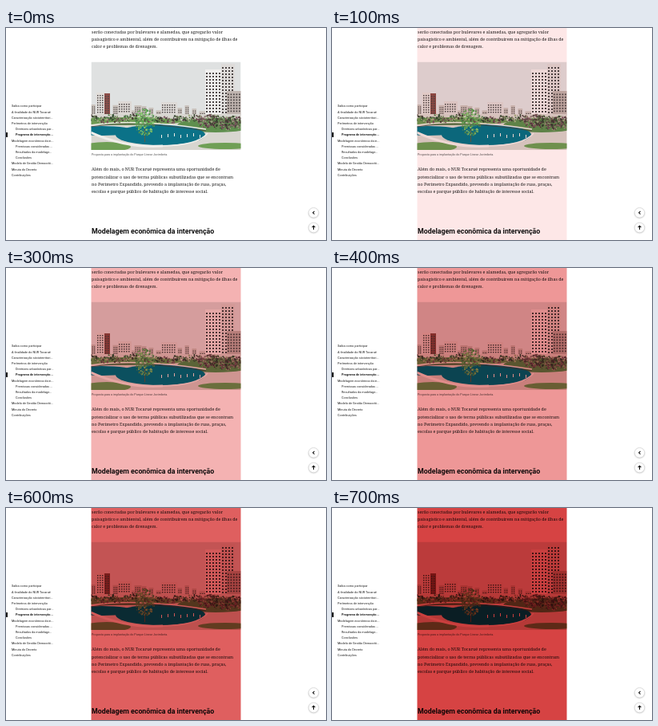
Animation, 400 px wide and 266 px high, one loop 2800 ms. Source, as an HTML page with a canvas:

```html
<!DOCTYPE html>
<html lang="pt">
<head>
<meta charset="utf-8">
<title>Modelagem econômica</title>
<style>
html, body { margin: 0; width: 100%; height: 100%; overflow: hidden; background: #fff; }
canvas { display: block; width: 400px; height: 266px; }
</style>
</head>
<body>
<canvas id="stage" width="400" height="266"></canvas>
<script>
const W = 400, H = 266, LOOP = 2800, STEP = 100, LAST = 7;
const SERIF = '"Noto Serif", serif', SANS = 'Roboto, sans-serif';
const COLUMN = { x: 106.5, w: 187 };
const PHOTO = { x: 106.5, y: 42.5, w: 187, h: 110.5 };

const view = document.getElementById('stage').getContext('2d');
const page = document.createElement('canvas');
page.width = W;
page.height = H;
const g = page.getContext('2d');

function random(seed) {
  return () => (seed = (seed * 16807) % 2147483647) / 2147483647;
}

function text(str, x, y, font, color) {
  g.font = font;
  g.fillStyle = color;
  g.fillText(str, x, y);
}

function paragraph(lines, y) {
  lines.forEach((s, i) => text(s, 107, y + i * 9.4, '5.35px ' + SERIF, '#1c1c1c'));
}

function rect(x, y, w, h, color) {
  g.fillStyle = color;
  g.fillRect(x, y, w, h);
}

function oval(x, y, rx, ry, color) {
  g.fillStyle = color;
  g.beginPath();
  g.ellipse(x, y, rx, ry, 0, 0, Math.PI * 2);
  g.fill();
}

function curve(x0, y0, cx, cy, x1, y1, width, color) {
  g.strokeStyle = color;
  g.lineWidth = width;
  g.beginPath();
  g.moveTo(x0, y0);
  g.quadraticCurveTo(cx, cy, x1, y1);
  g.stroke();
}

function tower(x, y, w, wall, gap) {
  const base = 110;
  rect(x, y, w, base - y, wall);
  for (let j = y + gap; j < base - gap; j += gap)
    for (let i = x + 1; i < x + w - 1; i += gap) rect(i, j, gap * 0.5, gap * 0.5, '#4d4747');
}

function foliage(rnd, cx, cy, rx, ry, colors) {
  for (let i = 0; i < rx * ry * 0.8; i++) {
    const a = rnd() * Math.PI * 2, d = Math.sqrt(rnd()), r = 0.4 + rnd() * 0.9;
    oval(cx + Math.cos(a) * d * rx, cy + Math.sin(a) * d * ry, r, r, colors[i % colors.length]);
  }
}

function skyline(rnd) {
  for (let x = PHOTO.x; x < 245; x += 9) tower(x, 96 + rnd() * 9, 5 + rnd() * 5, '#c9c1bb', 2.5);
  tower(113, 81, 11, '#e2deda', 3);
  tower(123, 82, 7, '#8d4e48', 3);
  tower(140, 92, 17, '#ddd8d4', 3);
  tower(194, 93, 20, '#dedad7', 3);
  tower(249, 52, 21, '#f0efee', 4);
  tower(269, 45, 17, '#dedbd9', 4);
  tower(276, 79, 18, '#bfb4af', 3.5);
}

function park() {
  rect(PHOTO.x, 108, PHOTO.w, 46, '#d8d6d0');
  oval(150, 117, 70, 5, '#6f9a54');
  oval(262, 122, 48, 9, '#5f8f4e');
  oval(120, 129, 40, 6, '#0b7288');
  oval(193, 134, 56, 13, '#0b7288');
  oval(126, 149, 30, 6, '#6f9f55');
  oval(274, 148, 34, 4, '#6f9f55');
  curve(106, 131, 150, 151, 196, 148, 3, '#f1efeb');
  curve(196, 148, 240, 147, 252, 132, 1.5, '#f1efeb');
  curve(106, 122, 160, 113, 250, 127, 1.5, '#eeeae4');
  curve(106, 124, 160, 115, 250, 129, 0.8, '#4b4643');
  for (let x = 194; x < 246; x += 8) rect(x, 132 + x % 3, 1, 4, '#f1eee8');
}

function trees(rnd) {
  const kinds = [
    ['#33422f', '#6d8358', '#4a3a36'],
    ['#4e7a48', '#2d4a2d', '#a3b184'],
    ['#7d5560', '#4c3a3c', '#9aa07e']
  ];
  for (let x = 109; x < 292; x += 7) {
    const size = x > 245 ? 8 : 4;
    foliage(rnd, x, 108 + size + rnd() * 4, size + 2, size, kinds[Math.floor(rnd() * kinds.length)]);
  }
  rect(173, 122, 1, 21, '#5d5c43');
  foliage(rnd, 173, 118, 13, 17, ['#64ac55', '#88c96f', '#4f8e50']);
}

function scene() {
  const rnd = random(23);
  g.save();
  g.beginPath();
  g.rect(PHOTO.x, PHOTO.y, PHOTO.w, PHOTO.h);
  g.clip();
  rect(PHOTO.x, PHOTO.y, PHOTO.w, PHOTO.h, '#dfe1e1');
  skyline(rnd);
  park();
  trees(rnd);
  g.restore();
}

function article() {
  paragraph([
    'serão conectadas por bulevares e alamedas, que agregarão valor',
    'paisagístico e ambiental, além de contribuírem na mitigação de ilhas de',
    'calor e problemas de drenagem.'
  ], 6.6);
  scene();
  text('Proposta para a implantação do Parque Linear Jovimbeta.', 107, 159.5, '3.7px ' + SANS, '#555');
  paragraph([
    'Além do mais, o NUR Tocarué representa uma oportunidade de',
    'potencializar o uso de terras públicas subutilizadas que se encontram',
    'no Perímetro Expandido, prevendo a implantação de ruas, praças,',
    'escolas e parque público de habitação de interesse social.'
  ], 179.2);
  text('Modelagem econômica da intervenção', 107, 258, 'bold 8.8px ' + SANS, '#111');
}

function sidebar() {
  // A leading ">" marks a second-level entry.
  [
    'Saiba como participar',
    'A finalidade do NUR Tocarué',
    'Caracterização sócioterritori...',
    'Perímetros de intervenção',
    '>Diretrizes urbanísticas par...',
    '>Programa de intervenção...',
    'Modelagem econômica da in...',
    '>Premissas consideradas ...',
    '>Resultados da modelage...',
    '>Conclusões',
    'Modelo de Gestão Democrát...',
    'Minuta do Decreto',
    'Contribuições'
  ].forEach((s, i) => {
    const sub = s[0] === '>', weight = i === 5 ? 'bold ' : '';
    text(sub ? s.slice(1) : s, sub ? 12 : 7, 99.4 + i * 7.2, weight + '3.85px ' + SANS, '#1c1c1c');
  });
  rect(0, 131, 2, 6, '#111');
}

function button(x, y, shaft) {
  g.save();
  g.shadowColor = 'rgba(0,0,0,.3)';
  g.shadowBlur = 2;
  g.shadowOffsetY = 0.5;
  oval(x, y, 6.2, 6.2, '#fff');
  g.restore();
  g.strokeStyle = '#d2d2d2';
  g.lineWidth = 0.6;
  g.stroke();

  // Chevron pointing left, or an arrow pointing up when it has a shaft.
  g.save();
  g.translate(x, y);
  if (shaft) g.rotate(Math.PI / 2);
  const tip = shaft ? -2.3 : -0.9;
  g.strokeStyle = '#111';
  g.lineWidth = 1.1;
  g.beginPath();
  g.moveTo(tip + 1.9, -1.9);
  g.lineTo(tip, 0);
  g.lineTo(tip + 1.9, 1.9);
  g.moveTo(tip, 0);
  g.lineTo(tip + shaft, 0);
  g.stroke();
  g.restore();
}

function tint(step) {
  const k = step / LAST;
  const red = 255 - 41 * k ** 1.6, rest = 255 - 188 * k ** 1.06;
  return `rgb(${red}, ${rest}, ${rest})`;
}

function draw() {
  const t = performance.now() % LOOP;
  const step = Math.min(Math.floor(t / STEP), LAST);
  view.globalCompositeOperation = 'source-over';
  view.drawImage(page, 0, 0);
  view.globalCompositeOperation = 'multiply';
  view.fillStyle = tint(step);
  view.fillRect(COLUMN.x, 0, COLUMN.w, H);
  requestAnimationFrame(draw);
}

rect(0, 0, W, H, '#fff');
article();
sidebar();
button(384.5, 231.8, 0);
button(384.5, 250.5, 4.8);
draw();
</script>
</body>
</html>
```
